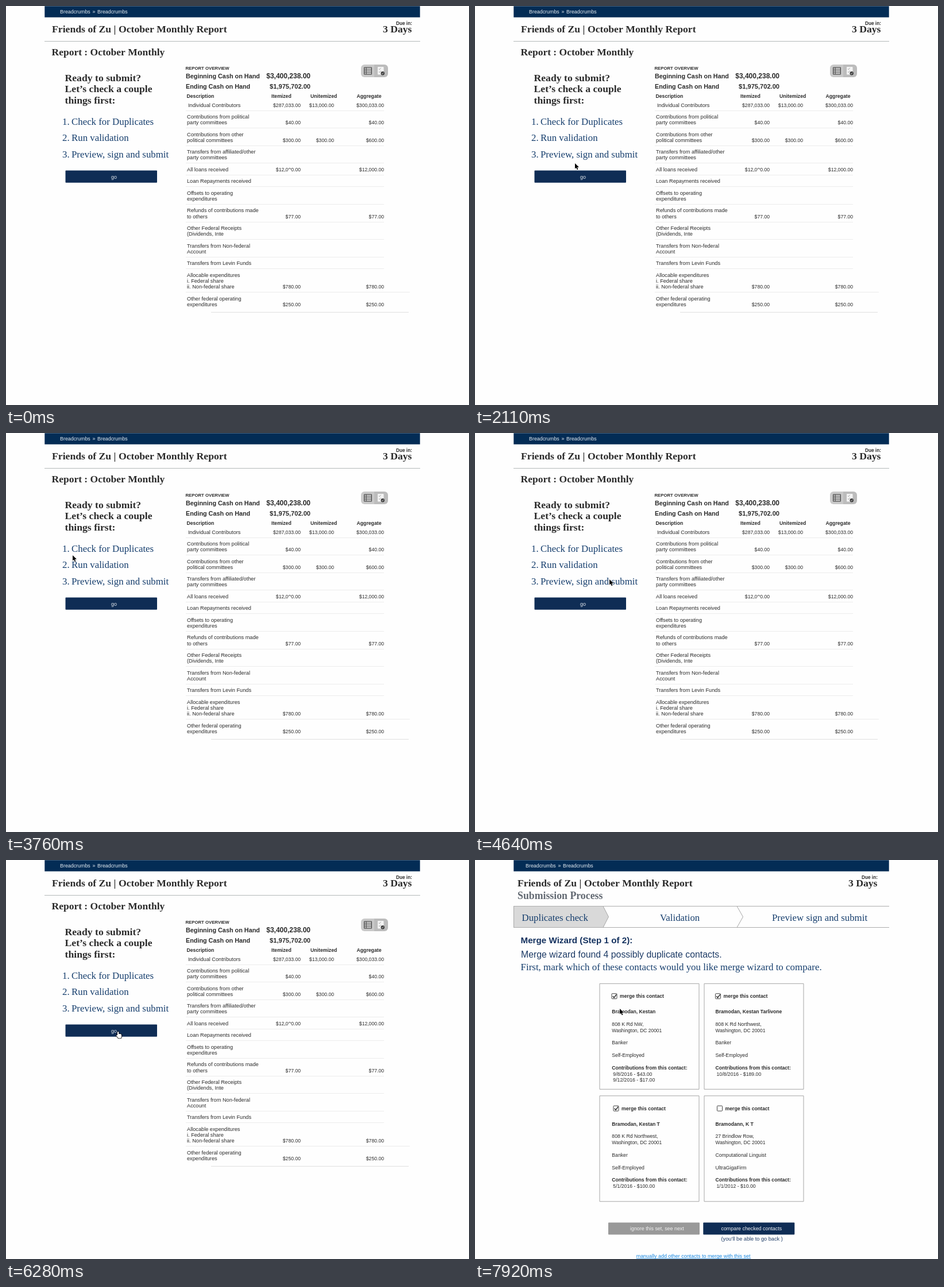
An HTML page with a canvas that plays this animation: 806x695 px, repeating every 8000 ms.

```html
<!DOCTYPE html>
<html lang="en">
<head>
<meta charset="utf-8">
<title>Monthly report</title>
<style>
html, body { margin: 0; width: 100%; height: 100%; overflow: hidden; background: #fefefe; }
canvas { display: block; width: 806px; height: 695px; }
</style>
</head>
<body>
<canvas id="stage"></canvas>
<script>
const W = 806, H = 695, LOOP = 8000, SWITCH = 6730;
const SANS = '"Liberation Sans", Arial, sans-serif';
const SERIF = '"Liberation Serif", "Times New Roman", serif';
const PAPER = '#fefefe', NAVY = '#032c55', BUTTON = '#0f2d55', BLUE = '#173f6e', INK = '#2b2b2b';
const GROUP = 'Friends of Zu';

const canvas = document.getElementById('stage');
const ratio = window.devicePixelRatio || 1;
canvas.width = W * ratio;
canvas.height = H * ratio;
const ctx = canvas.getContext('2d');

function text(str, x, y, font, color = INK, align = 'left') {
  ctx.font = font;
  ctx.fillStyle = color;
  ctx.textAlign = align;
  ctx.fillText(str, x, y);
}
const sans = (size, bold) => (bold ? 'bold ' : '') + size + 'px ' + SANS;
const serif = (size, bold) => (bold ? 'bold ' : '') + size + 'px ' + SERIF;
const TITLE = serif(17.7, true), LIST = serif(16.85);

function rect(x, y, w, h, color, r = 0) {
  ctx.fillStyle = color;
  ctx.beginPath();
  ctx.roundRect(x, y, w, h, r);
  ctx.fill();
}

function stroke(color, width = 1) {
  ctx.strokeStyle = color;
  ctx.lineWidth = width;
  ctx.stroke();
}

function line(points, color, width) {
  ctx.beginPath();
  for (const [x, y] of points) ctx.lineTo(x, y);
  stroke(color, width);
}
const rule = (x1, x2, y, color) => line([[x1, y], [x2, y]], color);

function tick(x, y, s, color, width) {
  line([[x, y], [x + s * .34, y + s * .4], [x + s, y - s * .5]], color, width);
}

function header(dx) {
  const pale = '#e6ebf1', small = sans(8.9);
  rect(0, 0, W, H, PAPER);
  rect(67.3, 0.2, 653.4, 19.5, NAVY);
  text('Breadcrumbs', 94 + dx, 12.5, small, pale);
  text('»', 150.5 + dx, 12.5, small, pale);
  text('Breadcrumbs', 159 + dx, 12.5, small, pale);
  text(GROUP + ' | October Monthly Report', 80 + dx, 46, TITLE);
  text('Due in:', 707 + dx, 32.5, sans(8.3, true), INK, 'right');
  text('3 Days', 706.5 + dx, 46, TITLE, INK, 'right');
}

// lines of text, then itemized, unitemized and aggregate sums
const ROWS = [
  ['Individual Contributors', '$287,033.00', '$13,000.00', '$300,033.00'],
  ['Contributions from political|party committees', '$40.00', '', '$40.00'],
  ['Contributions from other|political committees', '$300.00', '$300.00', '$600.00'],
  ['Transfers from affiliated/other|party committees'],
  ['All loans received', '$12,000.00', '', '$12,000.00'],
  ['Loan Repayments received'],
  ['Offsets to operating|expenditures'],
  ['Refunds of contributions made|to others', '$77.00', '', '$77.00'],
  ['Other Federal Receipts|(Dividends, Inte'],
  ['Transfers from Non-federal|Account'],
  ['Transfers from Levin Funds'],
  ['Allocable expenditures|i. Federal share|ii. Non-federal share', '$780.00', '', '$780.00'],
  ['Other federal operating|expenditures', '$250.00', '', '$250.00']
];
const PITCH = 10.22;

function table() {
  let y = 175.5;
  ROWS.forEach(([label, ...sums], row) => {
    const lines = label.split('|');
    lines.forEach((s, i) => text(s, row ? 315 : 317, y + i * PITCH, sans(9.2)));
    y += (lines.length - 1) * PITCH;
    sums.forEach((s, i) => text(s, [513, 571, 658][i], y, sans(8.65), INK, 'right'));
    // the loans row has a half-covered digit
    if (label.startsWith('All loans')) rect(491.3, y - 3.2, 4.8, 4.5, PAPER);
    if (row < ROWS.length - 1) rule(313, row === 11 ? 703 : 658, Math.round(y + 7) - .5, '#ececec');
    y += 2 * PITCH;
  });
  rule(357, 701, 533.5, '#e0e0e0');
}

function toggle() {
  const shade = ctx.createLinearGradient(618, 0, 665, 0);
  shade.addColorStop(.5, '#c9c9c9');
  shade.addColorStop(.5, '#bcbcbc');
  rect(618, 102, 47, 22, shade, 6);
  rect(623, 106.5, 14, 13, '#454545', 1);
  for (let i = 0; i < 4; i++) {
    rect(624.2, 107.7 + i * 2.9, 2.4, 1.9, '#dedede');
    rect(627.6, 107.7 + i * 2.9, 8.2, 1.9, '#dedede');
  }
  rect(647, 106, 10.5, 13.5, '#f4f4f4', 1);
  tick(649, 109.5, 3.6, '#aaa');
  tick(649, 114.5, 3.6, '#aaa');
  rect(652.5, 114.1, 6.4, 6.4, '#3c3c3c', 3.2);
  tick(654.2, 117.4, 3, '#eee', .8);
}

function reportPage() {
  header(0);
  rule(67, 721, 61.5, '#b4baba');
  text('Report : October Monthly', 79.5, 86, serif(17.5, true));

  ['Ready to submit?', 'Let’s check a couple', 'things first:'].forEach((s, i) =>
    text(s, 102.5, 130.5 + i * 19.8, TITLE));
  ['Check for Duplicates', 'Run validation', 'Preview, sign and submit'].forEach((s, i) => {
    text(i + 1 + '.', 98, 207 + i * 28.4, LIST, BLUE);
    text(s, 114, 207 + i * 28.4, LIST, BLUE);
  });
  rect(103.5, 286.5, 159.5, 21.3, BUTTON, 1);
  text('go', 183, 300.5, sans(9), '#dfe4ea');

  text('REPORT OVERVIEW', 312.5, 110.7, sans(7.75, true));
  text('Beginning Cash on Hand', 313, 126.3, sans(10.85, true));
  text('Ending Cash on Hand', 313, 144.3, sans(10.8, true));
  text('$3,400,238.00', 530, 126.3, sans(12, true), INK, 'right');
  text('$1,975,702.00', 530, 144.3, sans(11.1, true), INK, 'right');
  toggle();

  const heads = { Description: 314.5, Itemized: 462, Unitemized: 530, Aggregate: 610.5 };
  for (const s in heads) text(s, heads[s], 160, sans(8.7, true));
  table();
}

const STREET = '808 K Rd Northwest,';
const CITY = 'Washington, DC 20001';
const CARDS = [
  { name: 'Bramodan, Kestan', street: '808 K Rd NW,', gifts: ['9/8/2016 - $43.00', '9/12/2016 - $17.00'] },
  { name: 'Bramodan, Kestan Tarlivone', street: STREET, gifts: ['10/8/2016 - $189.00'] },
  { name: 'Bramodan, Kestan T', street: STREET, gifts: ['5/1/2016 - $100.00'] },
  { name: 'Bramodann, K T', street: '27 Brindlow Row,', gifts: ['1/1/2012 - $10.00'],
    job: 'Computational Linguist', firm: 'UltraGigaFirm' }
];

function card({ name, street, gifts, job = 'Banker', firm = 'Self-Employed' }, i) {
  const col = i % 2, row = i >> 1;
  const x = 217 + col * 182, y = 215 + row * 195.5;
  const left = 238.3 + col * 180.2;
  const bold = sans(8.6, true), body = sans(8.7);

  ctx.beginPath();
  ctx.rect(x, y + .3, 173, 184);
  stroke('#a6a6a6');

  const bx = 238 + col * 180.5 + row * 3, by = y + 17.7;
  ctx.beginPath();
  ctx.roundRect(bx, by, 9, 9, 1);
  stroke('#444');
  if (i < 3) tick(bx + 1.8, by + 4.6, 6.4, '#222', 1.4);
  text('merge this contact', bx + 14, y + 25, sans(8.66, true));

  // the body is set on a fixed line grid
  const put = (s, n, font = body, dx = 0) => text(s, left + dx, y + 52.2 + n * 10.84, font);
  put(name, 0, bold);
  put(street, 2);
  put(CITY, 3, sans(8.45));
  put(job, 5);
  put(firm, 7);
  put('Contributions from this contact:', 9, bold);
  gifts.forEach((s, n) => put(s, 10 + n, body, 2));
}

function steps() {
  ctx.beginPath();
  for (const [x, y] of [[67.5, 80.5], [223, 80.5], [232.5, 99], [223, 117.5], [67.5, 117.5]]) ctx.lineTo(x, y);
  ctx.closePath();
  ctx.fillStyle = '#d9d9d9';
  ctx.fill();
  stroke('#a6a6a6');
  for (const y of [80.5, 117.5]) rule(67, 721, y, '#adadad');
  line([[456, 80.5], [466.5, 99], [456, 117.5]], '#a6a6a6');
  text('Duplicates check', 81.5, 106, LIST, BLUE);
  text('Validation', 322, 106, LIST, BLUE);
  text('Preview sign and submit', 517, 106, LIST, BLUE);
}

function mergePage() {
  header(-6);
  text('Submission Process', 74, 68.3, serif(17.8, true), '#636a73');
  steps();

  text('Merge Wizard (Step 1 of 2):', 79.5, 144.8, sans(15.2, true), '#15325f');
  text('Merge wizard found 4 possibly duplicate contacts.', 80, 169.5, sans(15.85), '#1d3b66');
  text('First, mark which of these contacts would you like merge wizard to compare.',
    79.5, 192, serif(16.97), BLUE);

  CARDS.forEach(card);

  rect(232, 631.5, 159, 21, '#999', 1);
  text('ignore this set, see next', 270, 645.3, sans(8.9), '#f2f2f2');
  rect(397.3, 631.5, 159, 21, BUTTON, 1);
  text('compare checked contacts', 428.5, 645.3, sans(8.9), '#f2f4f7');
  text('(you’ll be able to go back )', 428.5, 663.2, sans(9.2), '#1d3b66');
  text('manually add other contacts to merge with this set', 280.7, 693.2, sans(8.95), '#1787e0');
  rect(280.7, 694, 199.5, .8, '#1787e0');
}

// The pointer moves in even beats: [beat, x, y].
const BEGIN = 1040, BEAT = 149.57;
const PATH = [
  [0, 69, 435], [6, 206, 284], [7, 174, 274], [9, 150, 218], [11, 243, 198], [14, 190, 197],
  [18, 116, 213], [21, 221, 197], [23, 264, 226], [24, 234, 255], [28, 194, 288],
  [33, 194, 288], [35, 195, 299], [43, 195, 299], [46, 252, 259]
];

function pointer(t) {
  const beat = Math.floor((t - BEGIN) / BEAT);
  if (beat < 0) return null;
  const n = PATH.findIndex(k => k[0] > beat);
  if (n < 0) return PATH.at(-1).slice(1);
  const [b0, x0, y0] = PATH[n - 1], [b1, x1, y1] = PATH[n];
  const u = (beat - b0) / (b1 - b0);
  return [x0 + (x1 - x0) * u, y0 + (y1 - y0) * u];
}

function cursor(shape, x, y, edge, width, fill) {
  ctx.save();
  ctx.translate(x, y);
  ctx.lineJoin = 'round';
  ctx.beginPath();
  shape();
  stroke(edge, width);
  ctx.fillStyle = fill;
  ctx.fill();
  ctx.restore();
}

function arrow() {
  for (const [x, y] of [[0, 0], [0, 9.6], [2.2, 7.6], [3.8, 11.2], [5.4, 10.5], [3.9, 7], [6.9, 6.8]]) ctx.lineTo(x, y);
  ctx.closePath();
}

function hand() {
  ctx.roundRect(-1, 0, 2.2, 8, 1.1);
  ctx.roundRect(-1, 4, 7, 7.6, [1, 2, 2, 3]);
  ctx.roundRect(-2.8, 6, 3.2, 2.6, 1.2);
}

function frame(now) {
  const t = now % LOOP;
  ctx.setTransform(ratio, 0, 0, ratio, 0, 0);
  if (t < SWITCH) reportPage(); else mergePage();
  const p = pointer(t);
  if (!p) return;
  if (t >= 6130 && t < SWITCH) cursor(hand, ...p, '#000', 1.5, '#fff');
  else cursor(arrow, ...p, '#fff', 1.4, '#000');
}

const start = performance.now();
function loop() {
  frame(performance.now() - start);
  requestAnimationFrame(loop);
}
loop();
</script>
</body>
</html>
```
